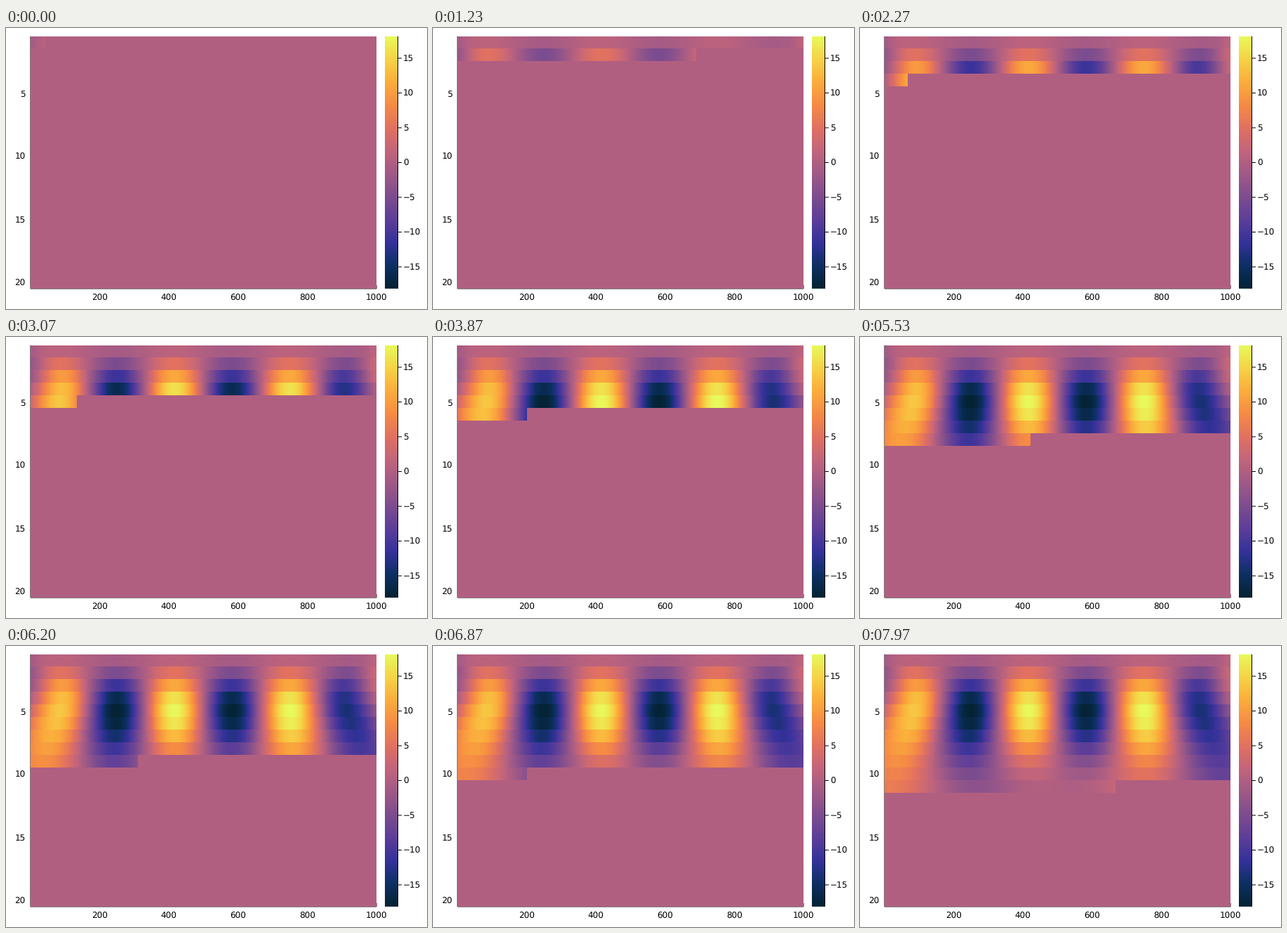
Animation, 600 px wide and 400 px high, one loop 8 s. Source, as a matplotlib script:

```python
import numpy as np
import matplotlib.pyplot as plt
from matplotlib.animation import FuncAnimation
from matplotlib.colors import LinearSegmentedColormap

W, H, DPI = 600, 400, 100
PX = 72 / DPI
ROWS, COLS = 20, 1000
LOOP_MS, TICK_MS = 8000, 20
TOTAL_STEPS = 450           # steps needed to fill the whole grid
PEAK = 18.13
LEFT, RIGHT, TOP, BOTTOM = 35, 528, 11.8, 371
FONT = 12 * PX

plt.rcParams["font.family"] = "DejaVu Sans"
plt.rcParams["text.hinting"] = "none"

thermal = LinearSegmentedColormap.from_list("thermal", [
    "#042333", "#0d3064", "#35329b", "#5d3e99", "#7e4d8f", "#a05a87",
    "#c2657c", "#e17161", "#f68b45", "#fbad3c", "#f6d346", "#e8fa5b"], N=256)


def wavelet_rows():
    """Ricker wavelet transform of a three-cycle sine, one scale per row."""
    t = np.arange(1, COLS + 1) / COLS
    signal = np.sin(6 * np.pi * t)
    lag = t[:, None] - t[None, :]
    rows = []
    for r in range(1, ROWS + 1):
        scale = r / 60
        z2 = (lag / scale) ** 2
        kernel = (1 - z2) * np.exp(-z2 / 2) / np.sqrt(scale)
        rows.append(kernel @ signal)
    rows = np.array(rows)
    return rows * PEAK / np.abs(rows).max()


def pixel_axes(x0, y0, x1, y1):
    ax = fig.add_axes([x0 / W, 1 - y1 / H, (x1 - x0) / W, (y1 - y0) / H])
    ax.axis("off")
    return ax


def line(xs, ys):
    stage.plot(xs, ys, color="black", lw=PX, solid_capstyle="butt", snap=False)


def label(x, y, text, ha):
    stage.text(x, y, text, ha=ha, va="center_baseline", fontsize=FONT)


fig = plt.figure(figsize=(W / DPI, H / DPI), dpi=DPI, facecolor="white")
stage = pixel_axes(0, 0, W, H)
stage.set(xlim=(0, W), ylim=(H, 0))

# Axis lines and labels; the heatmap covers the inward ticks
line([LEFT, LEFT], [TOP, BOTTOM])
line([LEFT, RIGHT], [BOTTOM, BOTTOM])
line([RIGHT, RIGHT], [BOTTOM - 5, BOTTOM])
for col in range(200, COLS + 1, 200):
    label(LEFT + (col - 0.5) / COLS * (RIGHT - LEFT), 382.9, str(col), "center")
for row in range(5, ROWS + 1, 5):
    y = TOP + (row - 0.5) / ROWS * (BOTTOM - TOP)
    label(27.5, y + 0.3, str(row), "right")

# Colour bar
BAR_L, BAR_R, ZERO, UNIT = 540, 558, 191.5, 9.9
line([BAR_R + 0.5] * 2, [TOP, BOTTOM])
for v in range(-15, 16, 5):
    y = ZERO - v * UNIT
    line([BAR_R, BAR_R + 6], [y, y])
    label(566, y - 0.7, str(v).replace("-", "\u2212"), "left")
bar = pixel_axes(BAR_L, TOP, BAR_R, BOTTOM)
bar.imshow(np.linspace(1, 0, 256)[:, None], cmap=thermal, aspect="auto",
           interpolation="nearest")

values = wavelet_rows().ravel()
heat = pixel_axes(LEFT, TOP, RIGHT, BOTTOM)
image = heat.imshow(np.zeros((ROWS, COLS)), cmap=thermal, vmin=-PEAK, vmax=PEAK,
                    aspect="auto", interpolation="nearest")


def update(i):
    # Thirty steps a second, each starting on a whole 10 ms
    step = int((i + 0.5) * TICK_MS * 0.03 + 0.15)
    done = round(values.size * (step + 1) / TOTAL_STEPS)
    grid = np.zeros_like(values)
    grid[:done] = values[:done]
    image.set_data(grid.reshape(ROWS, COLS))
    return [image]


anim = FuncAnimation(fig, update, frames=LOOP_MS // TICK_MS, interval=TICK_MS,
                     repeat=True, repeat_delay=0)
plt.show()
```
